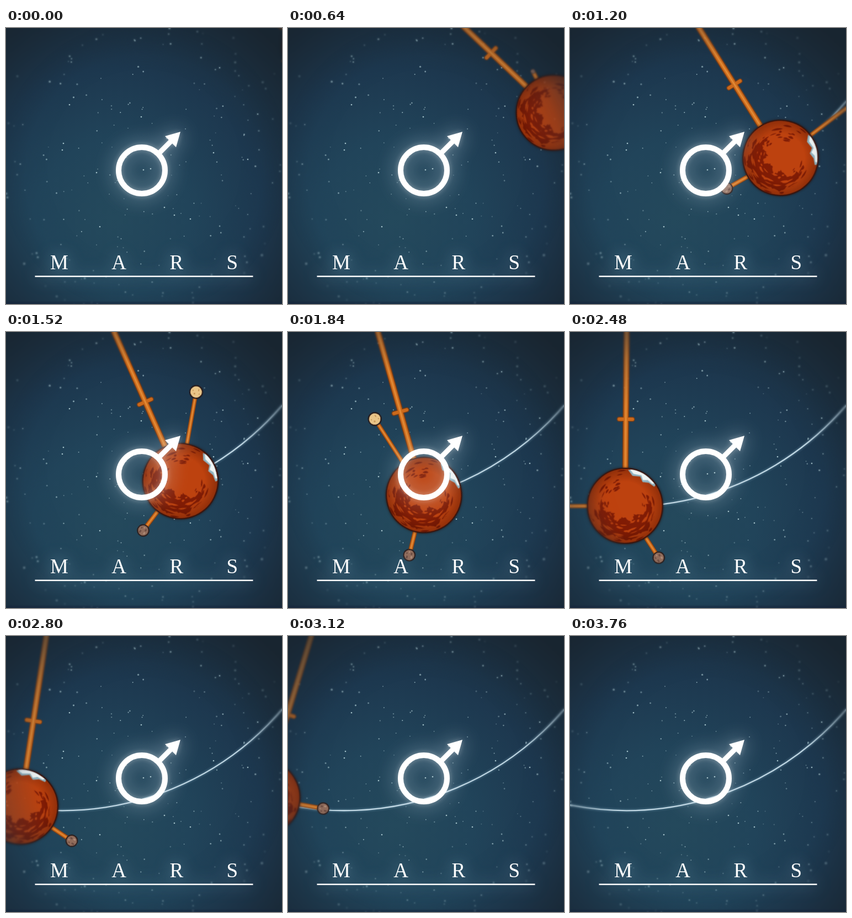
Write an HTML page that moves like this. It is 500 by 500 pixels and loops after 3840 ms.

```html
<!DOCTYPE html>
<html lang="en">
<head>
<meta charset="utf-8">
<title>Mars</title>
<style>
html, body { margin: 0; width: 100%; height: 100%; overflow: hidden; background: #1a2835; }
.stage {
  position: relative; width: 500px; height: 500px; overflow: hidden;
  background:
    radial-gradient(circle at 250px 265px, transparent 215px, rgba(22, 32, 42, .5) 350px),
    radial-gradient(circle at 195px 345px, #24495c 0, #21445a 140px, #1d384f 270px, #1a2935 430px);
}
.stage > * { position: absolute; inset: 0; width: 500px; height: 500px; }
.scene {
  --fade: radial-gradient(circle at 250px 250px, #000 190px, rgba(0, 0, 0, .76) 250px, rgba(0, 0, 0, .48) 290px, rgba(0, 0, 0, .25) 340px);
  -webkit-mask-image: var(--fade);
  mask-image: var(--fade);
}
.haze {
  --ring: radial-gradient(circle at 250px 250px, transparent 175px, #000 265px);
  backdrop-filter: blur(1.6px);
  -webkit-mask-image: var(--ring);
  mask-image: var(--ring);
}

/* 48 poses of 80 ms */
.swing, .spin, .trail, .arm, .reach, .ball { animation: 3840ms steps(48) infinite; }
.swing { animation-name: swing; }
.spin { animation-name: spin; }
.trail { animation-name: trail; stroke-dasharray: 1; filter: drop-shadow(0 0 2px rgba(160, 205, 230, .6)); }
.inner { animation-name: inner; }
.outer { animation-name: outer; }
.reach { animation-name: reach; }
.ball { animation-name: ball; transform-box: fill-box; transform-origin: center; }
.planet { filter: drop-shadow(0 0 2px rgba(35, 12, 8, .8)); }

@keyframes swing { from { transform: rotate(-62.7deg); } to { transform: rotate(35.2deg); } }
@keyframes spin { from { transform: rotate(104.9deg); } to { transform: rotate(-128.1deg); } }
@keyframes trail { from { stroke-dashoffset: 1; } to { stroke-dashoffset: 0; } }
@keyframes inner {
  0% { transform: rotate(400deg); animation-timing-function: steps(8); }
  16.6667% { transform: rotate(289.5deg); animation-timing-function: steps(7); }
  31.25% { transform: rotate(182.5deg); animation-timing-function: steps(33); }
  100% { transform: rotate(-77.5deg); }
}
@keyframes outer {
  0% { transform: rotate(153deg); animation-timing-function: steps(8); }
  16.6667% { transform: rotate(113.5deg); animation-timing-function: steps(7); }
  31.25% { transform: rotate(-5deg); animation-timing-function: steps(8); }
  47.9167% { transform: rotate(-107.1deg); animation-timing-function: steps(8); }
  64.5833% { transform: rotate(-180.8deg); animation-timing-function: steps(17); }
  100% { transform: rotate(-296deg); }
}
@keyframes reach {
  0%, 8.3333% { transform: translateX(-70px); animation-timing-function: steps(4); }
  16.6667% { transform: translateX(-28px); animation-timing-function: steps(4); }
  25%, 100% { transform: translateX(0); }
}
@keyframes ball {
  0%, 16.6667% { transform: scale(.4); animation-timing-function: steps(4); }
  25%, 100% { transform: scale(1); }
}

.bar { fill: none; stroke-linecap: round; }
.edge { stroke: #7b3d14; }
.body { stroke: #cb691b; }
.shine { stroke: #e28b36; }
.sign { filter: drop-shadow(0 0 5px rgba(255, 255, 255, .35)) drop-shadow(0 0 18px rgba(215, 232, 245, .6)); }
.name { filter: drop-shadow(0 0 14px rgba(150, 195, 215, .7)); }
.name text { font: 37px "Liberation Serif", "Times New Roman", serif; letter-spacing: 78.4px; }
</style>
</head>
<body>
<div class="stage">
  <svg id="sky" viewBox="0 0 500 500"></svg>

  <svg class="scene" viewBox="0 0 500 500">
    <defs>
      <clipPath id="disc"><circle r="68"/></clipPath>
      <radialGradient id="limb">
        <stop offset=".65" stop-color="#3a0a00" stop-opacity="0"/>
        <stop offset="1" stop-color="#3a0a00" stop-opacity=".35"/>
      </radialGradient>
    </defs>
    <path class="trail" pathLength="1" fill="none" stroke="#bfd6e2" stroke-width="2.3"
      d="M568 32A524 524 0 0 1 -202 219"/>
    <g transform="translate(104.5 -206)">
      <g class="swing">
        <g class="bar">
          <path class="edge" stroke-width="11.5" d="M0 0V521"/>
          <path class="edge" stroke-width="9" d="M-12 364H12"/>
          <path class="body" stroke-width="8" d="M0 0V521"/>
          <path class="body" stroke-width="6" d="M-12 364H12"/>
          <path class="shine" stroke-width="3" d="M0 0V521"/>
        </g>
        <g transform="translate(0 521)">
          <g class="arm outer">
            <g class="bar">
              <path class="edge" stroke-width="8" d="M0 0H160"/>
              <path class="body" stroke-width="5.5" d="M0 0H160"/>
              <path class="shine" stroke-width="2" d="M0 0H160"/>
            </g>
            <g transform="translate(164 0)">
              <circle r="11.5" fill="#e9c588" stroke="#25191a" stroke-width="2.2"/>
              <path fill="#c99a5c" d="M-5-4h3v3h-3zM2 3h4v2h-4zM1-7h2v2h-2zM-4 5h2v2h-2z"/>
            </g>
          </g>
          <g class="arm inner">
            <g class="reach">
              <g class="bar">
                <path class="edge" stroke-width="8.5" d="M0 0H110"/>
                <path class="body" stroke-width="6" d="M0 0H110"/>
                <path class="shine" stroke-width="2" d="M0 0H110"/>
              </g>
              <g transform="translate(112 0)">
                <g class="ball">
                  <circle r="10.3" fill="#916c5b" stroke="#2b1d1c" stroke-width="2"/>
                  <path fill="#6d4d43" d="M-5-5h4v3h-4zM2 2h5v3h-5zM-4 4h3v2h-3z"/>
                  <path fill="#ad8a76" d="M1-6h4v3h-4zM-7 0h3v2h-3z"/>
                </g>
              </g>
            </g>
          </g>
          <g class="planet">
            <circle r="68" fill="#bd420f"/>
            <g clip-path="url(#disc)">
              <g class="spin">
                <path id="sea" fill="#801c05"/>
                <path id="dark" fill="#801c05"/>
                <path id="light" fill="#bd420f"/>
              </g>
              <circle r="68" fill="url(#limb)"/>
              <g class="spin">
                <path fill="#8fb3c0" d="M50-42L58-36 67-18 67 12 62 13 60 1 53-8 57-18 48-29Z"/>
                <path fill="#f0f5f4" d="M53-40L60-32 66-18 67 9 63 7 62-4 56-10 60-18 52-30Z"/>
              </g>
            </g>
            <circle r="68" fill="none" stroke="#3a140d" stroke-width="2.2"/>
          </g>
        </g>
      </g>
    </g>
  </svg>

  <div class="haze"></div>

  <svg viewBox="0 0 500 500" fill="#fff">
    <g class="sign">
      <circle cx="246" cy="258" r="42" fill="none" stroke="#fff" stroke-width="10"/>
      <path d="M276 228L302 202" stroke="#fff" stroke-width="9"/>
      <path d="M316 188L288 196 308 216Z"/>
    </g>
    <g class="name">
      <text x="80" y="437">MARS</text>
      <rect x="52.5" y="448.7" width="395" height="2.5"/>
    </g>
  </svg>
</div>
<script>
let seed = 41;
const rnd = () => (seed = seed * 16807 % 2147483647) / 2147483647;
const el = id => document.getElementById(id);
const polar = (r, a) => `${(r * Math.cos(a)).toFixed(1)} ${(r * Math.sin(a)).toFixed(1)}`;

// Stars: small and crisp near the middle, larger and fainter outside
const star = (x, y, r, o) =>
  `<circle cx="${x.toFixed(1)}" cy="${y.toFixed(1)}" r="${r.toFixed(2)}" opacity="${o.toFixed(2)}"/>`;
let stars = "";
for (let i = 0; i < 250; i++) {
  const a = rnd() * Math.PI * 2, d = 20 + 290 * Math.sqrt(rnd()), far = d / 310;
  stars += star(250 + d * Math.cos(a), 250 + d * Math.sin(a),
    .6 + far * (.6 + 1.2 * rnd()), (.3 + .6 * rnd()) * (1 - far * .5));
}
const bright = [[245, 161], [104, 209], [102, 221], [287, 325], [376, 226], [164, 262], [170, 360],
  [305, 339], [387, 72], [456, 156], [249, 257], [262, 255], [334, 346], [115, 139], [438, 238]];
for (const [x, y] of bright) stars += star(x, y, 1.3, .85);
el("sky").innerHTML = `<g fill="#b9d6dc">${stars}</g><path d="M0 496H500V500H0Z" fill="#14223a" opacity=".5"/>`;

// Dark crescent with a ragged shore
function crescent(from, to) {
  const near = [], far = [];
  for (let i = 0; i <= 60; i++) {
    const k = i / 60, a = from + (to - from) * k, thick = 17 * Math.sin(Math.PI * k) ** .6;
    near.push(polar(42 - thick + 5 * Math.sin(a * 7) + 5 * (rnd() - .5), a));
    far.unshift(polar(43 + thick + 3 * Math.sin(a * 9) + 4 * (rnd() - .5), a));
  }
  return `M${near.concat(far).join("L")}Z`;
}

// Surface streaks that follow the rim
function streaks(n, from, span) {
  let d = "";
  for (let i = 0; i < n; i++) {
    const a = from + span * rnd(), r = 30 + 35 * rnd(), w = .06 + .16 * rnd(), h = 1 + 2.2 * rnd();
    d += `M${polar(r, a - w)}Q${polar(r + h * 2, a)} ${polar(r + h * .4, a + w)}Q${polar(r - h, a + w * .3)} ${polar(r, a - w)}Z`;
  }
  return d;
}
el("sea").setAttribute("d", crescent(.7, 4.1));
el("dark").setAttribute("d", streaks(60, .2, 5.2));
el("light").setAttribute("d", streaks(48, .8, 3.2));
</script>
</body>
</html>
```
